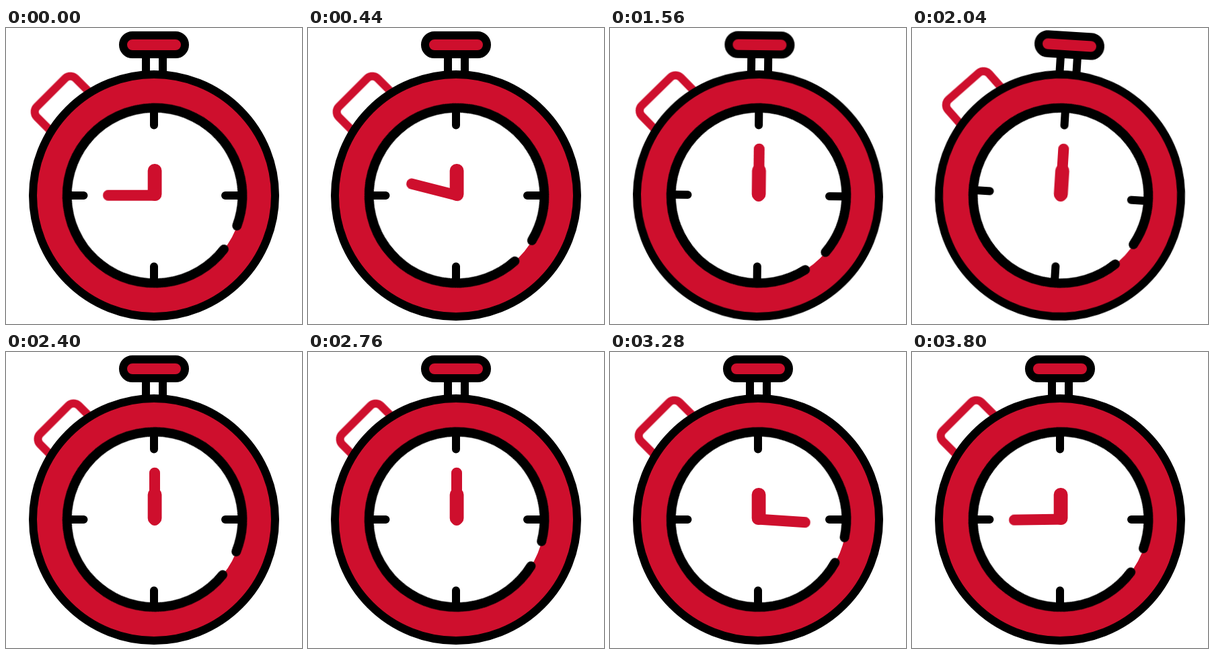
An HTML page for the animation above (3.84 s loop, 440 by 440 pixels).

```html
<!DOCTYPE html>
<html lang="en">
<head>
<meta charset="utf-8">
<title>Stopwatch</title>
<style>
  :root {
    --red: #ce0f2d;
    --loop: 3840ms;
    --ease: cubic-bezier(.333, 0, .667, 1);
  }
  html, body {
    margin: 0;
    width: 100%;
    height: 100%;
    overflow: hidden;
    background: #fff;
  }
  svg { display: block; width: 100vw; height: 100vh; }
  .line { fill: none; stroke: #000; stroke-width: 12; stroke-linecap: round; }
  .red { fill: var(--red); }

  .watch, .flap, .hand, .gap {
    animation: var(--loop) var(--ease) infinite;
  }
  .watch { transform-origin: 220px 249px; animation-name: tilt; }
  .flap { animation-name: press; }
  .hand { transform-origin: 221px 248.7px; animation-name: sweep; }
  .gap {
    transform-origin: 221px 249px;
    stroke-width: 14;
    stroke-dasharray: 342.4 17.6;
    animation: drift 1920ms cubic-bezier(.364, 0, .636, 1) -690ms infinite alternate;
  }

  @keyframes tilt {
    0%, 37.5% { transform: rotate(0deg); }
    51.04% { transform: rotate(4.5deg); }
    58.33%, 100% { transform: rotate(0deg); }
  }
  @keyframes press {
    0%, 59.37% { transform: translateY(0); }
    66.67% { transform: translateY(17px); }
    76.04%, 100% { transform: translateY(0); }
  }
  @keyframes sweep {
    0% {
      transform: rotate(270deg);
      animation-timing-function: cubic-bezier(.333, .05, .667, .465);
    }
    34.9%, 76.04% { transform: rotate(360deg); }
    99.74%, 100% { transform: rotate(630deg); }
  }
  @keyframes drift {
    from { transform: rotate(29.1deg); }
    to { transform: rotate(59.5deg); }
  }
</style>
</head>
<body>
<svg viewBox="0 0 440 440">
  <g class="watch">
    <g transform="translate(220 249) rotate(-45)">
      <rect class="flap" x="-40.7" y="-216.4" width="81.4" height="90" rx="11"
            fill="#fff" stroke="var(--red)" stroke-width="12"/>
    </g>

    <path class="line" d="M208 39V70M233 39V70"/>
    <rect class="line red" x="174" y="11" width="92" height="28" rx="14" style="fill: var(--red)"/>

    <circle class="line" cx="220" cy="249" r="180" style="fill: var(--red)"/>
    <circle cx="221" cy="249" r="130.5" fill="#fff"/>
    <circle class="line gap" cx="221" cy="249" r="130.3" pathLength="360"/>
    <path class="line" d="M220 121V144.5M220 377V354.5M93 249H115.5M349 249H326"/>

    <rect class="red" x="210.7" y="202" width="20.8" height="55" rx="10"/>
    <path class="hand" d="M221 250V179.7" fill="none" stroke="var(--red)"
          stroke-width="16" stroke-linecap="round"/>
  </g>
</svg>
</body>
</html>
```
